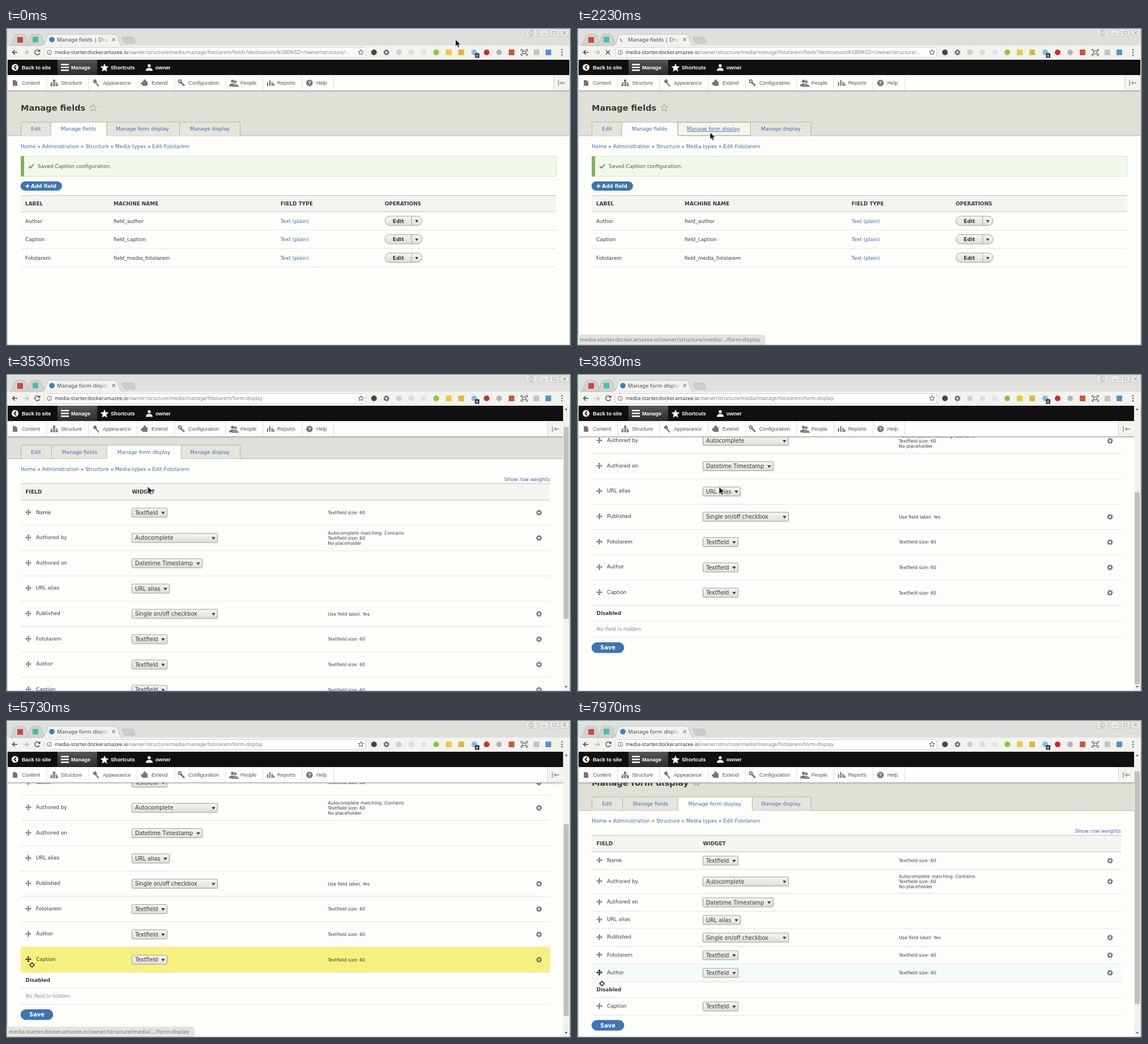
An HTML page for the animation above (8 s loop, 998x561 px).

```html
<!DOCTYPE html>
<html lang="en">
<head>
<meta charset="utf-8">
<title>Manage form display</title>
<style>
  html, body { margin: 0; height: 100%; overflow: hidden; }
  svg { display: block; width: 100vw; height: 100vh; }
  text { font: 8.95px "DejaVu Sans", sans-serif; fill: #383838; }
  .b { font-weight: bold; }
  .link { fill: #3a6db0; }
  .under { text-decoration: underline; }
  .mid { text-anchor: middle; }
  .h1 { font-size: 14.5px; font-weight: bold; }
  .small { font-size: 7.9px; }
  .select { font-size: 9.7px; }
  .save { font-size: 9.9px; font-weight: bold; fill: #fff; }
  .add { font-weight: bold; fill: #fff; }
  .ok { fill: #3c6428; }
  .i { font-style: italic; }
  .dim { fill: #8c8c8c; font-style: italic; }
  .ui { font: 9.55px "Noto Sans", sans-serif; fill: #4a4a4a; }
  .url { font: 8.87px "Noto Sans", sans-serif; fill: #828282; }
  .host { fill: #333; }
  .status { fill: #777; }
  .bar { font: bold 9.15px "Liberation Sans", Arial, sans-serif; fill: #fff; }
  .tray { font: 9.15px "Liberation Sans", Arial, sans-serif; fill: #555; }
  .badge { font-size: 6px; font-weight: bold; fill: #fff; }
  .line { fill: none; stroke: #666; stroke-width: 1.3; }
  #spin { transform-origin: 81px 20px; animation: spin .8s linear infinite; }
  @keyframes spin { to { transform: rotate(360deg); } }
</style>
</head>
<body>
<svg id="stage" viewBox="0 0 998 561" preserveAspectRatio="none"></svg>
<script>
const LOOP = 8000;
const CLICK = 2050, LOADED = 2750, DRAG = 5200, SWAP = 6200, REBUILT = 7350;
const PAGE = '#fdfdfa', HEAD = '#e0e0d8', GREY = '#757575';
let css = '', count = 0;

const pct = ms => +(ms / LOOP * 100).toFixed(4) + '%';

// Linear motion through [ms, ...values] points.
function track(name, points, style) {
  const frames = points.map(([ms, ...v]) => `${pct(ms)}{${style(...v)}}`);
  frames.push(`100%{${style(...points.at(-1).slice(1))}}`);
  css += `@keyframes ${name}{${frames.join('')}}#${name}{animation:${name} ${LOOP}ms linear infinite}`;
}

// Shows its content only between two times.
function during(from, to, body) {
  const name = 'span' + count++;
  css += `@keyframes ${name}{0%{opacity:0}${pct(from)}{opacity:1}${pct(to)}{opacity:0}}` +
         `.${name}{animation:${name} ${LOOP}ms step-end infinite}`;
  return `<g class="${name}">${body}</g>`;
}

const text = (x, y, s, cls = '') => `<text x="${x}" y="${y}" dy=".36em" class="${cls}">${s}</text>`;
const rect = (x, y, w, h, fill, more = '') => `<rect x="${x}" y="${y}" width="${w}" height="${h}" fill="${fill}" ${more}/>`;
const path = (d, fill = GREY, more = '') => `<path d="${d}" fill="${fill}" ${more}/>`;
const stroke = (d, color = GREY, w = 1.3) => path(d, 'none', `stroke="${color}" stroke-width="${w}"`);
const dot = (x, y, r, fill, more = '') => `<circle cx="${x}" cy="${y}" r="${r}" fill="${fill}" ${more}/>`;
const at = (x, y, body) => `<g transform="translate(${x} ${y})">${body}</g>`;
const caret = (x, y, w = 3.2) => path(`M${x - w} ${y - 2}h${2 * w}l${-w} 4.4z`, '#333');
const rule = (x, y, w, color = '#e3e4e2') => rect(x, y - .5, w, 1, color);

const gear = (x, y, c = GREY) =>
  dot(x, y, 2.9, 'none', `stroke="${c}" stroke-width="2"`) +
  dot(x, y, 4.4, 'none', `stroke="${c}" stroke-width="1.7" stroke-dasharray="1.73 1.73"`);

const arms = [0, 90, 180, 270];
const handle = (x, y, c = '#6a6a6a') => at(x, y, arms.map(a =>
  `<g transform="rotate(${a})">${path('M-.7 0V-3H-2.2L0-5.3 2.2-3H.7V0z', c)}</g>`).join(''));

const star = (x, y, r, c) => {
  const points = Array.from({ length: 10 }, (_, i) => {
    const a = i * Math.PI / 5, k = i % 2 ? r * .45 : r;
    return `${(x + k * Math.sin(a)).toFixed(2)},${(y - k * Math.cos(a)).toFixed(2)}`;
  });
  return `<polygon points="${points.join(' ')}" fill="none" stroke="${c}" stroke-linejoin="round"/>`;
};

const person = (x, y, c) => dot(x, y - 3, 2.7, c) + path(`M${x - 6} ${y + 6}q0-4 4-5h4q4 1 4 5z`, c);

function select(y, label, w) {
  return rect(222.5, y - 8, w, 16, 'url(#button)', 'rx="1" stroke="#9a9a94"') +
    text(228, y, label, 'select') + caret(222.5 + w - 7, y + .5);
}

// ---- page furniture -------------------------------------------------------

function pageTabs(right, tabs) {
  return rect(3, 100, right - 3, 90, HEAD) + rule(3, 190, right - 3, '#b4b4a8') +
    tabs.map(([x, w, mid, label, active]) =>
      path(`M${x} 190V168q0-2 2-2h${w - 4}q2 0 2 2v22`, active ? PAGE : '#e5e5dd', 'stroke="#b5b59f"') +
      (active ? rect(x + .5, 189, w - 1, 2, PAGE) : '') +
      text(mid, 178, label, 'link mid')).join('');
}

const crumbs = text(26, 208.3,
  ['Home', 'Administration', 'Structure', 'Media types', 'Edit <tspan class="link i">Fotolarem</tspan>']
    .map(s => `<tspan class="link">${s}</tspan>`).join(' » '));

function fieldsPage() {
  const rows = [['Author', 'field_author'], ['Caption', 'field_caption'], ['Fotolarem', 'field_media_fotolarem']];
  const hovered = rect(178.5, 166.5, 128, 23, '#f4f4ee', 'stroke="#b5b59f"') +
    text(241, 178, 'Manage form display', 'link mid under');
  return rect(3, 100, 992, 459, PAGE) +
    pageTabs(995, [[26.5, 52.5, 53, 'Edit'], [178, 128.5, 241, 'Manage form display'],
      [306.5, 107, 360, 'Manage display'], [79, 99, 128, 'Manage fields', true]]) +
    during(1280, LOADED, hovered) +
    text(26, 141, 'Manage fields', 'h1') + star(154, 141, 6.5, '#999') + crumbs +
    rect(26.5, 226.5, 945, 35, '#f2f9ec', 'stroke="#cfe3c0"') + rect(26, 226, 6, 36, '#7db35c') +
    stroke('M40 244l3 3 6-6.5', '#6aa544', 2.2) +
    text(56, 244, 'Saved <tspan class="i">Caption</tspan> configuration.', 'ok') +
    rect(26, 271, 72.5, 15.5, '#3c74b4', 'rx="7.7" stroke="#2f5f9a" stroke-width=".6"') +
    stroke('M34.5 278.8h7M38 275.3v7', '#fff', 1.7) + text(44, 278.8, 'Add field', 'add') +
    rect(26, 295.5, 946, 28.5, '#f4f4f0') + rule(26, 295.5, 946, '#c6c6be') + rule(26, 324, 946, '#c6c6be') +
    [[34, 'LABEL'], [190, 'MACHINE NAME'], [485, 'FIELD TYPE'], [669, 'OPERATIONS']]
      .map(([x, s]) => text(x, 309.5, s, 'b')).join('') +
    rows.map(([label, name], i) => {
      const y = 340.3 + i * 32.5;
      return text(34, y, label) + text(190, y, name) + text(485, y, 'Text (plain)', 'link') +
        rect(669.5, y - 8.3, 65.5, 16.4, 'url(#button)', 'rx="8.2" stroke="#a4a49c"') +
        rect(716, y - 8, 1, 16, '#a4a49c') + text(693, y, 'Edit', 'b mid') + caret(725.5, y + .6, 2.8) +
        rule(26, y + 16.3, 946);
    }).join('');
}

// ---- form display table ---------------------------------------------------

const FIELDS = [
  ['Name', 'Textfield', 62, ['Textfield size: 60']],
  ['Authored by', 'Autocomplete', 151, ['Autocomplete matching: Contains', 'Textfield size: 60', 'No placeholder']],
  ['Authored on', 'Datetime Timestamp', 124, []],
  ['URL alias', 'URL alias', 66, []],
  ['Published', 'Single on/off checkbox', 151, ['Use field label: Yes']],
  ['Fotolarem', 'Textfield', 62, ['Textfield size: 60']],
  ['Author', 'Textfield', 62, ['Textfield size: 60']],
  ['Caption', 'Textfield', 62, ['Textfield size: 60']]
];
const tint = (top, h) => rect(26, top, 935, h, '#f2fcfa');

function fieldRow([label, widget, w, notes], top, h, { fill, dark, plain } = {}) {
  const y = top + h / 2;
  if (plain) notes = [];
  return (fill ? rect(26, top, 935, h, fill) : '') +
    handle(39.5, y - .8, dark ? '#111' : undefined) + text(53, y - 1, label) + select(y, widget, w) +
    notes.map((s, i) => text(568.5, y + (i - (notes.length - 1) / 2) * 9, s, 'small')).join('') +
    (notes.length ? gear(941.5, y) : '') + rule(26, top + h, 935);
}

const disabled = (top, h) => text(34.5, top + h / 2 - .3, 'Disabled', 'b') + rule(26, top + h, 935);
const save = y => rect(26, y - 9, 57, 18, '#3c74b4', 'rx="9" stroke="#2f5f9a" stroke-width=".6"') +
  text(54.5, y, 'Save', 'save mid');

const TOP = 263, TALL = 44.65, LOW = 31.1;
const tallTop = i => TOP + i * TALL;
const tallRows = n => FIELDS.slice(0, n).map((f, i) => fieldRow(f, tallTop(i), TALL)).join('');

function passingTints() {
  return [2, 3, 4, 5, 6, 7].map(i => {
    const enter = 4712 + 52.4 * (i - 3);
    return during(i === 2 ? 4450 : enter, i === 7 ? DRAG : enter + 52.4, tint(tallTop(i), TALL));
  }).join('');
}

function compactTable() {
  let y = TOP, out = '';
  FIELDS.slice(0, 7).forEach((f, i) => {
    const h = i === 1 ? 42.4 : LOW;
    if (i === 6) out += during(7700, LOOP, tint(y, h));
    out += fieldRow(f, y, h);
    if (i === 6) out += during(7700, LOOP, handle(39.5, y + h / 2 - .8, '#111'));
    y += h;
  });
  out += disabled(y, 28.2) + fieldRow(FIELDS[7], y + 28.2, LOW, { plain: true });
  return out + save(569);
}

function displayPage() {
  const drag = { fill: '#f7f07e', dark: true }, end = tallTop(8), short = tallTop(7);
  return rect(3, 100, 981, 700, PAGE) +
    pageTabs(984, [[26.5, 54, 53, 'Edit'], [80.5, 98, 130, 'Manage fields'],
      [309.5, 104, 360, 'Manage display'], [178, 131.5, 243.5, 'Manage form display', true]]) +
    text(26, 141, 'Manage form display', 'h1') + star(211, 141, 6.5, '#999') + crumbs +
    text(880, 226.5, 'Show row weights', 'link') +
    rect(26, 234, 935, 29, '#f4f4f0') + rule(26, 234, 935, '#c6c6be') + rule(26, TOP, 935, '#c6c6be') +
    text(34.5, 248, 'FIELD', 'b') + text(222.5, 248, 'WIDGET', 'b') +
    during(LOADED, SWAP, passingTints() + tallRows(8) +
      during(4940, SWAP, handle(39.5, end - TALL / 2 - .8, '#111')) +
      during(DRAG, SWAP, fieldRow(FIELDS[7], short, TALL, drag)) +
      disabled(end, 28) + text(34.5, 662, 'No field is hidden.', 'dim') + rule(26, 676.5, 935) + save(694.8)) +
    during(SWAP, REBUILT, tallRows(7) + disabled(short, 28) +
      fieldRow(FIELDS[7], short + 28, TALL, drag) + save(666.6)) +
    during(REBUILT, LOOP, compactTable());
}

// ---- site toolbar ---------------------------------------------------------

function toolbar(right) {
  const items = [[28, 'Content'], [97, 'Structure'], [171, 'Appearance'], [257, 'Extend'],
    [322, 'Configuration'], [414, 'People'], [479, 'Reports'], [548, 'Help']];
  const icons = [
    path('M-4-5H1L4-2V5H-4z'),
    rect(-2, -6, 4, 4, GREY) + stroke('M0-2V2M-5 3V0H5V3') + [-6.5, -1.7, 3].map(x => rect(x, 2, 3.6, 3.6, GREY)).join(''),
    path('M-6-3L-1-7 2-2-2 1z') + stroke('M0 0L5 6', GREY, 2),
    rect(-4, -3, 9, 8, GREY) + dot(0, -4, 2.2, GREY) + dot(-5, 1, 2, GREY),
    stroke('M-2-2L5 5', GREY, 2.8) + dot(-3, -3, 2.4, 'none', `stroke="${GREY}" stroke-width="2"`),
    person(-2, 0, GREY) + person(3, 1, '#8b8b8b'),
    stroke('M-5 5V-1M-1 5V-5M3 5V-2M6 5V1', GREY, 2.3),
    dot(0, 0, 5.8, GREY) + text(0, 0, '?', 'bar mid')
  ];
  return rect(3, 56, right - 3, 27, '#101010') + rect(91, 56, 70, 27, 'url(#active)') +
    dot(16, 69.5, 6, '#fff') + stroke('M18 66l-3.5 3.5L18 73', '#111', 1.8) + text(28, 69.8, 'Back to site', 'bar') +
    stroke('M97 64.5h14M97 69.5h14M97 74.5h14', '#fff', 2.4) + text(115, 69.8, 'Manage', 'bar') +
    path('M174 62.5l2 5 5.5.4-4.2 3.6 1.3 5.5-4.6-3-4.6 3 1.3-5.5-4.2-3.6 5.5-.4z', '#fff') +
    text(185, 69.8, 'Shortcuts', 'bar') + person(253, 69.5, '#fff') + text(264, 69.8, 'owner', 'bar') +
    rect(3, 83, right - 3, 27, '#fefefc') + rect(3, 110, right - 3, 1.2, '#a9a9a4') +
    rect(3, 111.2, right - 3, 2, '#000', 'opacity=".08"') +
    items.map(([x, s], i) => at(x - 12, 97, icons[i]) + text(x, 97, s, 'tray')).join('') +
    [72, 146, 232, 298, 388, 454, 523, 579].map(x => rect(x - .5, 83, 1, 27, '#dcdcd8')).join('') +
    rect(right - 28, 83, 28, 27, '#f3f3f0') + rect(right - 28, 83, 1, 27, '#d0d0cc') +
    at(right - 14, 97, stroke('M-5-5V5', '#a5a5a5', 1.8) + stroke('M7 0H1', '#a5a5a5', 2) + path('M-3 0l4.5-3.5v7z', '#a5a5a5'));
}

// ---- browser window -------------------------------------------------------

const HOST = '<tspan class="host">media-starter.docker.amazee.io</tspan>/owner/structure/media';

function extensions() {
  const round = [[650, '#444'], [694, '#cfcfcf'], [716, '#dcdcdc'], [738, '#e2e2e2'], [760, '#8cc63f'],
    [827, '#7fbfe0'], [849, '#cf2a2a'], [871, '#b5b5b5']];
  const square = [[782, '#f3c92e'], [804, '#d9b93c'], [893, '#d9532c'], [937, '#c4c4c4'], [958, '#4b97d2']];
  return round.map(([x, c]) => dot(x, 43, 5, c)).join('') + gear(672, 43, '#666') +
    square.map(([x, c]) => rect(x - 5, 38, 10, 10, c)).join('') +
    rect(828.5, 44.5, 7.5, 8, '#1d1d3a', 'rx="1"') + text(832.2, 48.6, '0', 'badge mid') +
    stroke('M910 41v-3h3M918 38h3v3M921 45v3h-3M913 48h-3v-3', '#444', 1.2) + rect(912.5, 40.5, 6, 5, 'none', 'stroke="#444"') +
    [38.5, 43, 47.5].map(y => dot(982, y, 1.2, '#555')).join('');
}

function browser() {
  const tab = (x, w, fill) => path(`M${x} 31q3 0 5-5l4-11q2-4 5-4h${w - 28}q3 0 5 4l4 11q2 5 5 5z`, fill, 'stroke="#b4b6b2" stroke-width=".8"');
  const button = (x, w, icon) => rect(x, 2.5, w, 12, '#e9e9e6', 'rx="2" stroke="#c3c3bf" stroke-width=".8"') + at(x + w / 2, 8.5, icon);
  const title = s => text(90, 20.5, s, 'ui');
  const address = s => text(86, 43.2, HOST + s, 'url');
  const reload = stroke('M59 40.4a4.4 4.4 0 1 0 .4 4', '#555', 1.5) + path('M60.5 37.5v4.6h-4.6z', '#555');
  return rect(1.5, 1, 995, 30, '#dfe0dc') + rect(1.5, 31, 995, 25, '#f2f2ef') +
    rect(1.5, 56, 1.5, 503, '#d5d8d5') + rect(995, 56, 1.5, 503, '#d5d8d5') +
    tab(6, 38, '#d2d3cf') + tab(34, 38, '#d2d3cf') + tab(64, 142, '#f2f2ef') + rect(65, 30.4, 140, 2, '#f2f2ef') +
    path('M205 16h17q3 0 4 3l2 5q1 3-2 3h-14q-3 0-4-3z', '#cccdc9', 'stroke="#b4b6b2" stroke-width=".8"') +
    rect(20, 16, 10, 10, '#c9473d') + rect(47, 15.5, 10, 10, '#45bfae') +
    during(0, CLICK, dot(81, 20.5, 4.8, '#3583bd') + reload) +
    during(CLICK, 3000, `<g id="spin">${stroke('M77 20a4 4 0 0 1 4-4', '#555', 1.5)}</g>` + stroke('M51 39.5l7 7M58 39.5l-7 7', '#555', 1.5)) +
    during(3000, LOOP, dot(81, 20.5, 4.8, '#3583bd') + reload) +
    during(0, LOADED, title('Manage fields | Dru')) + during(LOADED, LOOP, title('Manage form displa')) +
    rect(164, 13, 20, 16, 'url(#fade)') + stroke('M187.5 17.7l5.4 5.4M192.9 17.7l-5.4 5.4', '#777', 1.1) +
    stroke('M20 43h-8M15.5 39l-4 4 4 4', '#444', 1.5) + stroke('M31 43h8M35.5 39l4 4-4 4', '#bbb', 1.5) +
    rect(68.5, 34.5, 567, 17.5, '#fefefc', 'rx="2" stroke="#d2d2ce"') +
    dot(76.5, 43, 4, 'none', 'stroke="#666"') + stroke('M76.5 42.4v3M76.5 40.4v1.2', '#666', 1.1) +
    during(0, LOADED, address('/manage/fotolarem/fields?destinations%5B0%5D=/owner/structure/...')) +
    during(LOADED, LOOP, address('/manage/fotolarem/form-display')) +
    star(627, 43, 5, '#555') + extensions() +
    button(918, 20, dot(0, 0, 4.6, 'none', 'stroke="#aaa"') + dot(0, -1.4, 1.5, '#aaa') + path('M-2.6 3q2.6-3.6 5.2 0z', '#aaa')) +
    button(943, 15, stroke('M-3 2h6', '#aaa')) + button(961, 15, rect(-3, -2.5, 6, 5, 'none', 'stroke="#aaa"')) +
    button(979, 15, stroke('M-3-3l6 6M3-3l-6 6', '#aaa'));
}

const scrollbar = rect(984, 56, 11, 503, '#f1f1ee') + path('M987 63.5h5l-2.5-3z', '#555') +
  path('M987 550.5h5l-2.5 3z', '#555') + '<rect id="thumb" x="985" y="66" width="9" fill="#c0c0bd"/>';

const statusBar = path('M1.5 541H330q3 0 3 3v15H1.5z', '#e3e3df') +
  text(5, 549.5, 'media-starter.docker.amazee.io/owner/structure/media/.../form-display', 'ui status');

const arrow = path('M0 0V12.5l2.9-2.6 2 4.6 2.1-.9-2-4.4 3.8-.2z', '#111', 'stroke="#fff" stroke-width=".7"');
const mover = `<g stroke="#fff" stroke-width=".6">${handle(0, 0, '#111')}</g>` + dot(0, 0, 3.2, 'none', 'stroke="#111" stroke-width="1.1"') + dot(0, 0, 1.2, '#fff');

// ---- motion ---------------------------------------------------------------

// [ms, scroll offset, document height]
const scrolling = [[0, 0, 714], [3450, 0, 714], [3530, 40, 714], [3780, 212, 714], [4250, 212, 714], [4400, 175, 714],
  [SWAP - .1, 175, 714], [SWAP, 175, 686], [REBUILT - .1, 175, 686], [REBUILT, 87, 589], [7560, 87, 589], [7720, 30.4, 589]];
const RAIL = 481, VIEW = 502;
track('scroll', scrolling, s => `transform:translateY(${-s}px)`);
track('thumb', scrolling, (s, h) => `transform:translateY(${(s / h * RAIL).toFixed(2)}px);height:${(VIEW / h * RAIL).toFixed(2)}px`);
track('cursor', [[0, 794, 20], [200, 794, 20], [500, 690, 118], [850, 430, 206], [1300, 235, 184], [2850, 235, 184],
  [3300, 250, 198], [3830, 251, 199], [4250, 251, 199], [4450, 235, 211], [4700, 235, 211], [4950, 46, 424],
  [5500, 46, 424], [6500, 46, 459], [7350, 46, 459], [7700, 44, 465]], (x, y) => `transform:translate(${x}px,${y}px)`);

const gradient = (id, dir, a, b) => `<linearGradient id="${id}" ${dir}><stop stop-color="${a}"/><stop offset="1" stop-color="${b}"/></linearGradient>`;
const down = 'x2="0" y2="1"';

document.getElementById('stage').innerHTML =
  `<defs>${gradient('button', down, '#f6f6f2', '#dfdfd8')}${gradient('active', down, '#555', '#2c2c2c')}` +
  gradient('fade', '', '#f2f2ef00', '#f2f2ef') +
  '<clipPath id="view"><rect x="3" y="56" width="992" height="503"/></clipPath></defs>' +
  rect(0, 0, 998, 561, '#54707a') + browser() +
  '<g clip-path="url(#view)">' +
  during(0, LOADED, fieldsPage() + toolbar(995)) +
  during(LOADED, LOOP, `<g id="scroll">${displayPage()}</g>` + toolbar(984) + scrollbar) + '</g>' +
  during(1400, LOADED, statusBar) + during(4960, 7050, statusBar) +
  `<g id="cursor">${during(0, 4940, arrow)}${during(4940, LOOP, mover)}</g>`;
document.head.appendChild(document.createElement('style')).textContent = css;
</script>
</body>
</html>
```
